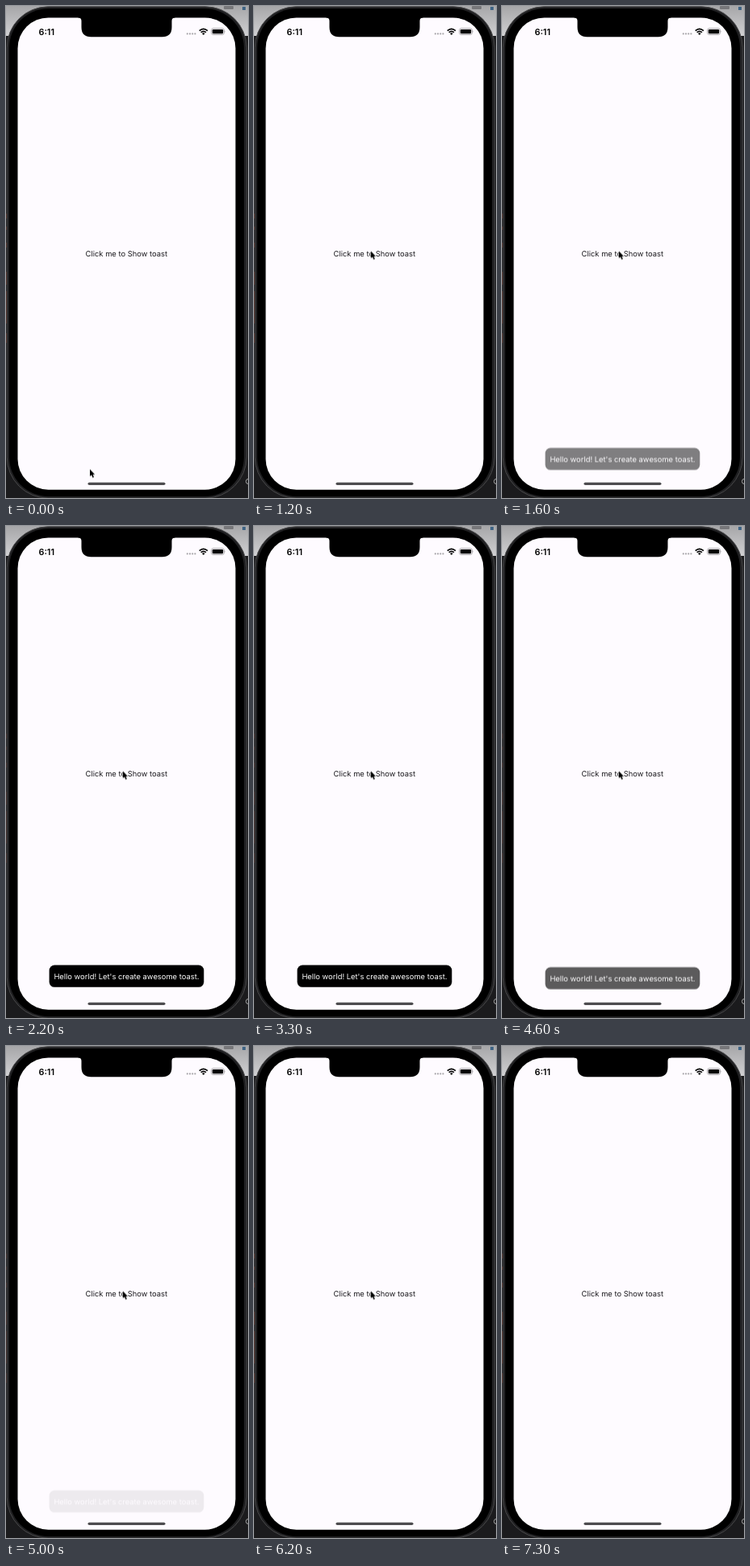
These frames come from a looping animation (300x609 px, 7400 ms). An HTML page:

```html
<!DOCTYPE html>
<html lang="en">
<head>
<meta charset="utf-8">
<title>Toast demo</title>
<style>
  html, body { margin: 0; width: 100%; height: 100%; overflow: hidden; background: #1b1b1d; }
  svg { display: block; width: 300px; height: 609px; }
  text { font-family: Inter, Roboto, sans-serif; text-rendering: geometricPrecision; }
  .label { font-size: 9.4px; text-anchor: middle; }
  .time { font-size: 10.8px; font-weight: 600; }
  .toast, .cursor, .specks { animation: 7.4s step-end infinite; }
  .toast { animation-name: toast; }
  .cursor { animation-name: cursor; }
  .specks { animation-name: specks; }

  /* slides up 7px while fading in, and back down while fading out */
  @keyframes toast {
    0% { opacity: 0; transform: translateY(7px); }
    17.567% { opacity: 0; transform: translateY(7px); animation-timing-function: steps(8, start); }
    28.378% { opacity: 1; transform: translateY(0); }
    59.459% { opacity: .91; transform: translateY(.6px); animation-timing-function: steps(2, end); }
    62.162% { opacity: .64; transform: translateY(2.6px); animation-timing-function: steps(4, end); }
    67.567% { opacity: .07; transform: translateY(6.5px); }
    68.918%, 100% { opacity: 0; transform: translateY(7px); }
  }
  @keyframes cursor {
    0% { opacity: 1; transform: translate(104px, 573.4px); }
    1.351% { transform: translate(178.5px, 407px); }
    5.405% { transform: translate(168px, 372px); }
    6.756% { transform: translate(157px, 338px); }
    8.108% { transform: translate(150px, 317px); }
    9.459% { transform: translate(146px, 306px); }
    10.81% { transform: translate(144.8px, 303.4px); }
    89.189% { transform: translate(160px, 268px); }
    90.54% { transform: translate(185px, 212px); }
    91.891% { opacity: 1; transform: translate(203.5px, 173px); }
    97.297%, 100% { opacity: 0; transform: translate(203.5px, 173px); }
  }
  @keyframes specks {
    0% { opacity: .5; }
    24.324% { opacity: .3; }
    77.027%, 100% { opacity: .5; }
  }
</style>
</head>
<body>
<svg viewBox="0 0 300 609">
  <defs>
    <linearGradient id="sky" x2="0" y2="1">
      <stop offset="0" stop-color="#a6a6a8"/>
      <stop offset="1" stop-color="#d0d0d2"/>
    </linearGradient>
  </defs>

  <!-- desktop behind the phone -->
  <rect width="300" height="609" fill="#1b1b1d"/>
  <rect width="300" height="37" fill="url(#sky)"/>
  <rect x="270" width="12" height="4" rx="1" fill="#77777a"/>
  <rect x="293" y="1" width="4" height="4" fill="#3f6485"/>
  <path class="specks" d="M.5 257v6m0 10v4m0 16v6m0 30v16m0 8v40m0 12v12" stroke="#8c3524" stroke-width="1.2"/>
  <path d="M300 585.5q-2.5 0-2.5 3t2.5 3" fill="none" stroke="#aaa"/>

  <!-- phone -->
  <rect x="1.2" y=".8" width="297" height="608.4" rx="51" fill="#202022" stroke="#484849"/>
  <rect x="4" y="3.2" width="291" height="603.8" rx="48.5"/>
  <rect x="14.5" y="14.4" width="270" height="584.3" rx="38" fill="#fefbff"/>
  <path d="M89.5 13.5v.9q4 0 4 4v7.9q0 12 12 12h88q12 0 12-12v-7.9q0-4 4-4v-.9z"/>

  <!-- status bar -->
  <text class="time" x="40.5" y="35.6">6:11</text>
  <g fill="#aaa8ac">
    <circle cx="224.8" cy="34.4" r="1.1"/>
    <circle cx="228" cy="34.4" r="1.1"/>
    <circle cx="231.2" cy="34.4" r="1.1"/>
    <circle cx="234.4" cy="34.4" r="1.1"/>
  </g>
  <g fill="none" stroke="#000" stroke-width="1.6">
    <path d="M239.7 30.6q5.1-4.6 10.2 0M241.6 32.7q3.2-2.7 6.4 0"/>
  </g>
  <path d="M243 34q1.8-1.4 3.6 0l-1.8 1.9z"/>
  <rect x="254.6" y="27.7" width="15.8" height="7.8" rx="2.3" fill="none" stroke="#9c9a9e" stroke-width=".8"/>
  <rect x="255.8" y="28.9" width="13.4" height="5.4" rx="1.3"/>
  <path d="M271.2 30.3q1.2 1.3 0 2.6z" fill="#9c9a9e"/>

  <text class="label" x="149.3" y="310" fill="#1c1b1f">Click me to Show toast</text>

  <g class="toast">
    <rect x="53.6" y="543.5" width="191.7" height="27.3" rx="6.5"/>
    <text class="label" x="149.4" y="560.6" fill="#fff">Hello world! Let's create awesome toast.</text>
  </g>

  <rect x="101.5" y="589.7" width="96" height="3.3" rx="1.65" fill="#4d4c4f"/>

  <path class="cursor" d="M0 0V8.8L2 7L3.5 10.4L5 9.7L3.6 6.4H6.2Z" stroke="#fff" stroke-width="1" paint-order="stroke"/>
</svg>
</body>
</html>
```
